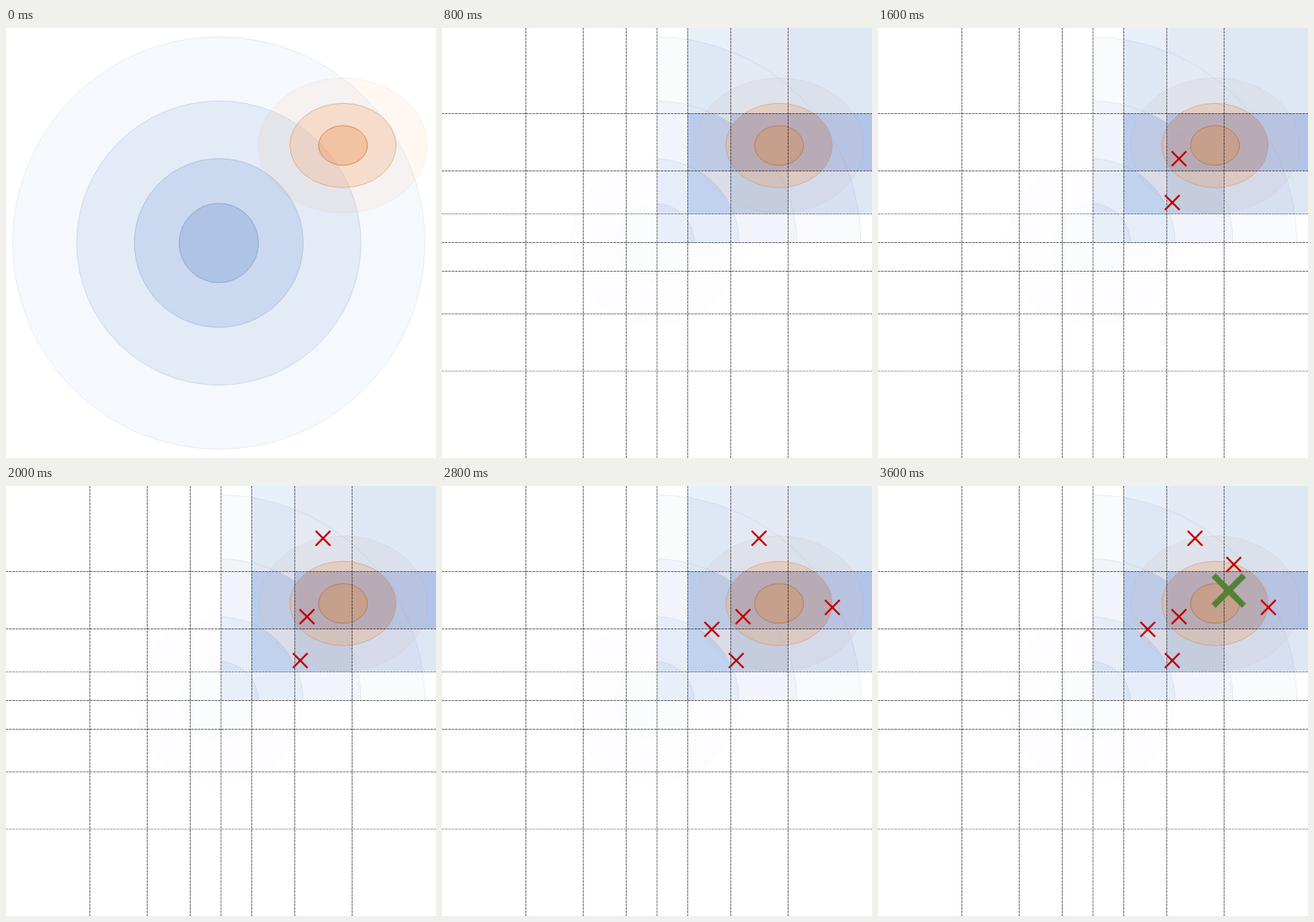
Write an HTML page with a canvas that moves like this. It is 510 px wide and 510 px high and loops after 4 s.

```html
<!DOCTYPE html>
<html lang="en">
<head>
<meta charset="utf-8">
<title>Grid search over two distributions</title>
<style>
  html, body { margin: 0; width: 100%; height: 100%; overflow: hidden; background: #fff; }
  canvas { display: block; width: 510px; height: 510px; }
</style>
</head>
<body>
<canvas id="stage" width="510" height="510"></canvas>
<script>
const ctx = document.getElementById('stage').getContext('2d');
const SIZE = 510, STEP = 400, LOOP = 4000;
const BLUE = { x: 252.4, y: 255 };
const PEAK = { x: 399.7, y: 139.3 };
const COLS = [99.5, 167.5, 218.5, 255, 291.5, 342.5, 410.5];
const ROWS = [101.5, 169.5, 220.5, 254.5, 288.5, 339, 407];
const FAINT_ROWS = [220.5, 407];

// samples in order of appearance
const SAMPLES = [[357, 155], [349, 207], [376, 62], [463, 144], [320, 170], [422, 93]];
const BEST = [416, 124];

// radius, fill, edge
const RINGS = [
  [244.5, '#f5f9fe', '#e7edf4'],
  [168.5, '#e2ebf6', '#d0dbea'],
  [100, '#cad9ef', '#b3c4de'],
  [47, '#afc3e5', '#95a9cf']
];
// radius, fill opacity of the dimmed rings
const DIM_RINGS = [[244.5, 0.03], [168.5, 0.04], [100, 0.05], [47, 0.07]];

// x0, y0, x1, y1, colour, then radius and colour of the ring that splits the cell
const CELLS = [
  [291.5, 0, 342.5, 101.5, '#e7eff9', 244.5, '#dee8f4'],
  [342.5, 0, 410.5, 101.5, '#e4e9f4'],
  [410.5, 0, 510, 101.5, '#dde8f4'],
  [291.5, 101.5, 342.5, 169.5, '#dde5f1', 168.5, '#bacceb'],
  [342.5, 101.5, 510, 169.5, '#b1c3e7', 168.5, '#a4b6db'],
  [291.5, 169.5, 342.5, 220.5, '#dde2ee', 100, '#c1d2ee'],
  [342.5, 169.5, 410.5, 220.5, '#c2cee3'],
  [410.5, 169.5, 510, 220.5, '#dde7f4', 244.5, '#d7e0f2']
];

function ellipse(c, rx, ry, fill, edge) {
  ctx.beginPath();
  ctx.ellipse(c.x, c.y, rx, ry, 0, 0, Math.PI * 2);
  if (fill) {
    ctx.fillStyle = fill;
    ctx.fill();
  }
  if (edge) {
    ctx.strokeStyle = edge;
    ctx.lineWidth = 1;
    ctx.stroke();
  }
}

function rect(x0, y0, x1, y1, color) {
  ctx.fillStyle = color;
  ctx.fillRect(x0, y0, x1 - x0, y1 - y0);
}

function clipped(x0, y0, x1, y1, draw) {
  ctx.save();
  ctx.beginPath();
  ctx.rect(x0, y0, x1 - x0, y1 - y0);
  ctx.clip();
  draw();
  ctx.restore();
}

function line(x0, y0, x1, y1) {
  ctx.beginPath();
  ctx.moveTo(x0, y0);
  ctx.lineTo(x1, y1);
  ctx.stroke();
}

function drawPriors() {
  for (const [r, fill, edge] of RINGS) ellipse(BLUE, r, r, fill, edge);
  ellipse(PEAK, 100, 80, 'rgba(244,177,131,0.1)', 'rgba(220,180,155,0.15)');
  ellipse(PEAK, 63, 50, 'rgba(244,177,131,0.35)', 'rgba(200,135,95,0.45)');
  ellipse(PEAK, 29, 23.5, 'rgba(237,125,49,0.28)', 'rgba(190,105,55,0.6)');
}

function drawCells() {
  ellipse(BLUE, 100, 100, '#fdfdff');
  ellipse(BLUE, 47, 47, '#fbfcfe');
  clipped(255, 0, SIZE, 254.5, () => {
    for (const [r, a] of DIM_RINGS) ellipse(BLUE, r, r, `rgba(68,114,196,${a})`);
    rect(255, 220.5, 291.5, 254.5, 'rgba(255,255,255,0.4)');
    for (const [x0, y0, x1, y1, color, r, inner] of CELLS) {
      rect(x0, y0, x1, y1, color);
      if (r) clipped(x0, y0, x1, y1, () => ellipse(BLUE, r, r, inner));
    }
    for (const [r] of DIM_RINGS) ellipse(BLUE, r, r, null, 'rgba(75,105,160,0.1)');
  });
  ellipse(PEAK, 100, 80, 'rgba(205,195,200,0.2)', 'rgba(190,160,150,0.14)');
  ellipse(PEAK, 63, 50, 'rgba(232,177,138,0.42)');
  clipped(342.5, 101.5, SIZE, 169.5, () => ellipse(PEAK, 63, 50, 'rgba(180,168,181,0.8)'));
  ellipse(PEAK, 63, 50, null, 'rgba(200,140,100,0.45)');
  ellipse(PEAK, 29, 23.5, '#c69f8d', '#b5805f');
}

function drawGrid() {
  ctx.save();
  ctx.lineWidth = 0.9;
  ctx.setLineDash([3, 1]);
  ctx.lineDashOffset = 0.5;
  ctx.strokeStyle = 'rgba(0,0,0,0.65)';
  for (const x of COLS) line(x, 0, x, SIZE);
  for (const y of ROWS) {
    ctx.strokeStyle = `rgba(0,0,0,${FAINT_ROWS.includes(y) ? 0.45 : 0.65})`;
    line(0, y, SIZE, y);
  }
  ctx.restore();
}

function cross([x, y], half, width, color) {
  ctx.strokeStyle = color;
  ctx.lineWidth = width;
  line(x - half, y - half, x + half, y + half);
  line(x - half, y + half, x + half, y - half);
}

function render(time) {
  const step = Math.floor((time % LOOP) / STEP);
  rect(0, 0, SIZE, SIZE, '#fff');
  if (step < 2) drawPriors();
  else drawCells();
  if (step >= 1) drawGrid();
  const shown = Math.max(0, step - 2);
  for (const p of SAMPLES.slice(0, shown)) cross(p, 8.7, 2.3, '#c00000');
  if (step === 9) cross(BEST, 18, 7, '#548235');
}

const start = performance.now();
function tick(now) {
  render(Math.max(0, now - start));
  requestAnimationFrame(tick);
}
render(0);
requestAnimationFrame(tick);
</script>
</body>
</html>
```
